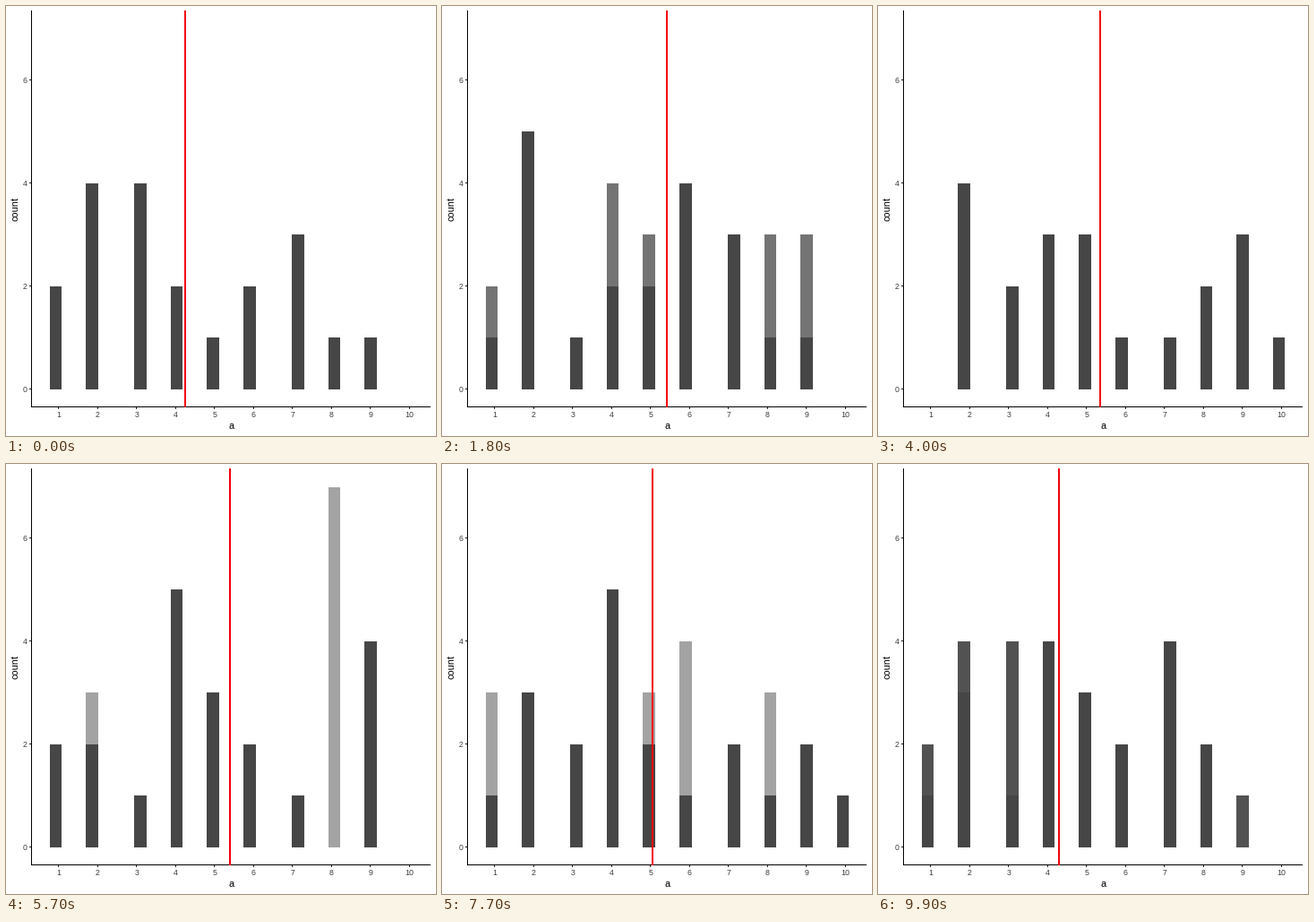
A matplotlib script for the animation above (10000 ms loop, 480 by 480 pixels).

```python
import math

import matplotlib.pyplot as plt
from matplotlib.animation import FuncAnimation
from matplotlib.patches import Rectangle

SIZE, DPI = 480, 80
LEFT, RIGHT, TOP, BOTTOM = 28.66, 474.3, 5, 447.6   # panel edges in px
BIN_W = 9 / 29                                      # histogram bin in data units
BIN_PX = 13.505
ZERO_Y, UNIT_Y = 427.5, 57.42
BAR, RED, TICK, LABEL = "#464646", "#f4000a", "#222222", "#3c3c3c"

# How often each value 1..10 occurs in each sample of 20
SAMPLES = [
    (2, 4, 4, 2, 1, 2, 3, 1, 1, 0),
    (1, 5, 1, 2, 2, 4, 3, 1, 1, 0),
    (2, 0, 1, 4, 3, 2, 2, 3, 3, 0),
    (2, 1, 2, 2, 1, 1, 5, 4, 1, 1),
    (0, 4, 2, 3, 3, 1, 1, 2, 3, 1),
    (2, 2, 1, 5, 3, 2, 1, 0, 4, 0),
    (0, 3, 1, 3, 2, 2, 0, 7, 2, 0),
    (1, 3, 2, 5, 2, 1, 2, 1, 2, 1),
    (3, 2, 0, 2, 3, 4, 1, 3, 2, 0),
    (1, 3, 1, 4, 3, 2, 4, 2, 0, 0),
]
STEPS = 10  # frames per sample


def snap(v):
    return math.floor(v + 0.5)


def px_x(value):
    return LEFT + (value / BIN_W - 1) * BIN_PX


def px_y(count):
    return ZERO_Y - count * UNIT_Y


def mean(counts):
    return sum((i + 1) * c for i, c in enumerate(counts)) / sum(counts)


fig = plt.figure(figsize=(SIZE / DPI, SIZE / DPI), dpi=DPI, facecolor="white")
ax = fig.add_axes([0, 0, 1, 1])
ax.set_xlim(0, SIZE)
ax.set_ylim(SIZE, 0)
ax.axis("off")


def box(x0, y0, x1, y1, color, z):
    patch = Rectangle((x0, y0), x1 - x0, y1 - y0, facecolor=color,
                      linewidth=0, antialiased=False, zorder=z)
    return ax.add_patch(patch)


def label(x, y, text, px, color, **kw):
    ax.text(x, y, text, fontsize=px * 72 / DPI, color=color,
            family="Liberation Sans", va="baseline", **kw)


def make_bars(z):
    bars = []
    for value in range(1, 11):
        mid = px_x(round(value / BIN_W) * BIN_W)
        bars.append(box(snap(mid - BIN_PX / 2), snap(ZERO_Y),
                        snap(mid + BIN_PX / 2), snap(ZERO_Y), BAR, z))
    return bars


def set_bars(bars, counts, alpha=1):
    base = snap(ZERO_Y)
    for bar, count in zip(bars, counts):
        top = snap(px_y(count))
        bar.set_y(top)
        bar.set_height(base - top)
        bar.set_alpha(alpha)
        bar.set_visible(count > 0 and alpha > 0)


# Axes, ticks and labels
box(28, TOP, 29, 448, "black", 4)
box(28, 447, 474, 448, "black", 4)
for value in range(1, 11):
    x = math.floor(px_x(value))
    box(x, 448, x + 1, 450, TICK, 3)
    label(px_x(value), 459, str(value), 8.8, LABEL, ha="center")
for count in (0, 2, 4, 6):
    y = math.floor(px_y(count))
    box(26, y, 28, y + 1, TICK, 3)
    label(23.7, px_y(count) + 3.15, str(count), 8.8, LABEL, ha="right")
label((LEFT + RIGHT) / 2, 472.2, "a", 11, "black", ha="center")
label(13.5, (TOP + BOTTOM) / 2, "count", 11, "black", ha="center",
      rotation=90, rotation_mode="anchor")

old_bars = make_bars(1)
new_bars = make_bars(2)
mean_line = box(0, TOP, 2, 448, RED, 5)


def draw(n):
    i, k = divmod(n, STEPS)
    old, new = SAMPLES[i], SAMPLES[(i + 1) % len(SAMPLES)]
    hold = 3 if i == 0 else 4
    t = max(0, k - hold) / (STEPS - hold)
    t = (1 - math.cos(math.pi * t)) / 2
    set_bars(old_bars, old)
    set_bars(new_bars, new, t)
    center = mean(old) + (mean(new) - mean(old)) * t
    mean_line.set_x(snap(px_x(center)) - 1)
    return [*old_bars, *new_bars, mean_line]


anim = FuncAnimation(fig, draw, frames=STEPS * len(SAMPLES), interval=100,
                     repeat=True, repeat_delay=0, blit=False)
plt.show()
```
